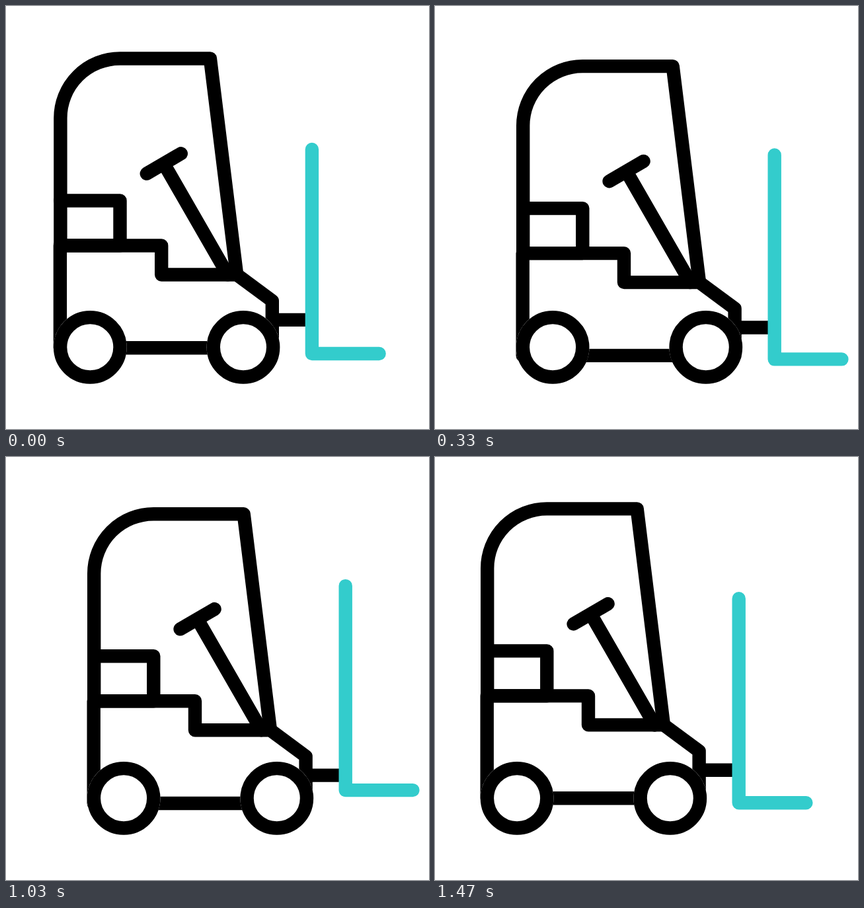
These frames come from a looping animation (640 by 640 pixels, 1670 ms). An HTML page:

```html
<!DOCTYPE html>
<html lang="en">
<head>
<meta charset="utf-8">
<title>Forklift</title>
<style>
  html, body { margin: 0; width: 100%; height: 100%; overflow: hidden; background: #fff; }
  svg { display: block; width: 100vw; height: 100vh; }
  .line { fill: none; stroke: #000; stroke-width: 20.4; stroke-linecap: round; stroke-linejoin: round; }
  .teal { stroke: #3cc; }
  .mask { fill: #fff; }
</style>
</head>
<body>
<svg viewBox="0 0 640 640">
  <g id="truck">
    <g id="cab" class="line">
      <path d="M78.7 516.2V361.4H232V405.4H346L399.6 445V516.2Z"/>
      <path d="M79.2 361.4V168.5A90 90 0 0 1 169.2 78.4H305.7L346 405.4"/>
      <path d="M79.2 293.4H169.3V361.4H79.2"/>
      <path d="M209.6 252.5L261.6 222.2M235.6 237.4L332.3 405.4"/>
      <path d="M399.6 473.8H455"/>
    </g>
    <path id="fork" class="line teal" d="M459.7 214.3V523.3H561.4"/>
    <g class="mask">
      <circle cx="124.1" cy="516.3" r="55.4"/>
      <circle cx="355.8" cy="516.3" r="55.4"/>
    </g>
    <g class="line">
      <circle cx="124.1" cy="516.3" r="45.2"/>
      <circle cx="355.8" cy="516.3" r="45.2"/>
    </g>
  </g>
</svg>
<script>
  const LOOP = 1670;
  const [truck, cab, fork] = ['truck', 'cab', 'fork'].map(id => document.getElementById(id));

  // Smooth progress from 0 to 1 between two steps of the 30 per second clock
  function ease(n, from, to) {
    const u = Math.min(1, Math.max(0, (n - from) / (to - from)));
    return u * u * (3 - 2 * u);
  }

  const move = (el, x, y) => el.setAttribute('transform', `translate(${x.toFixed(2)} ${y.toFixed(2)})`);

  function draw(now) {
    const t = now % LOOP;
    const n = Math.floor((Math.floor(t / 10) + 0.5) * 0.3);
    const settle = ease(n, 24.5, 40);

    // Drive forward and back
    move(truck, 54 * (ease(n, -1.72, 9.9) - ease(n, 33.8, 43.7)), 0);
    // Cab sinks on its wheels, then rises
    move(cab, 0, 12.7 * (ease(n, -2, 9.1) - settle));
    // Fork dips, lifts, then returns
    move(fork, 0, 28.3 * ease(n, -1.5, 6.3) - 59.3 * ease(n, 6.3, 16.7) + 31 * settle);
  }

  const start = performance.now();
  function tick() {
    draw(performance.now() - start);
    requestAnimationFrame(tick);
  }
  tick();
</script>
</body>
</html>
```
